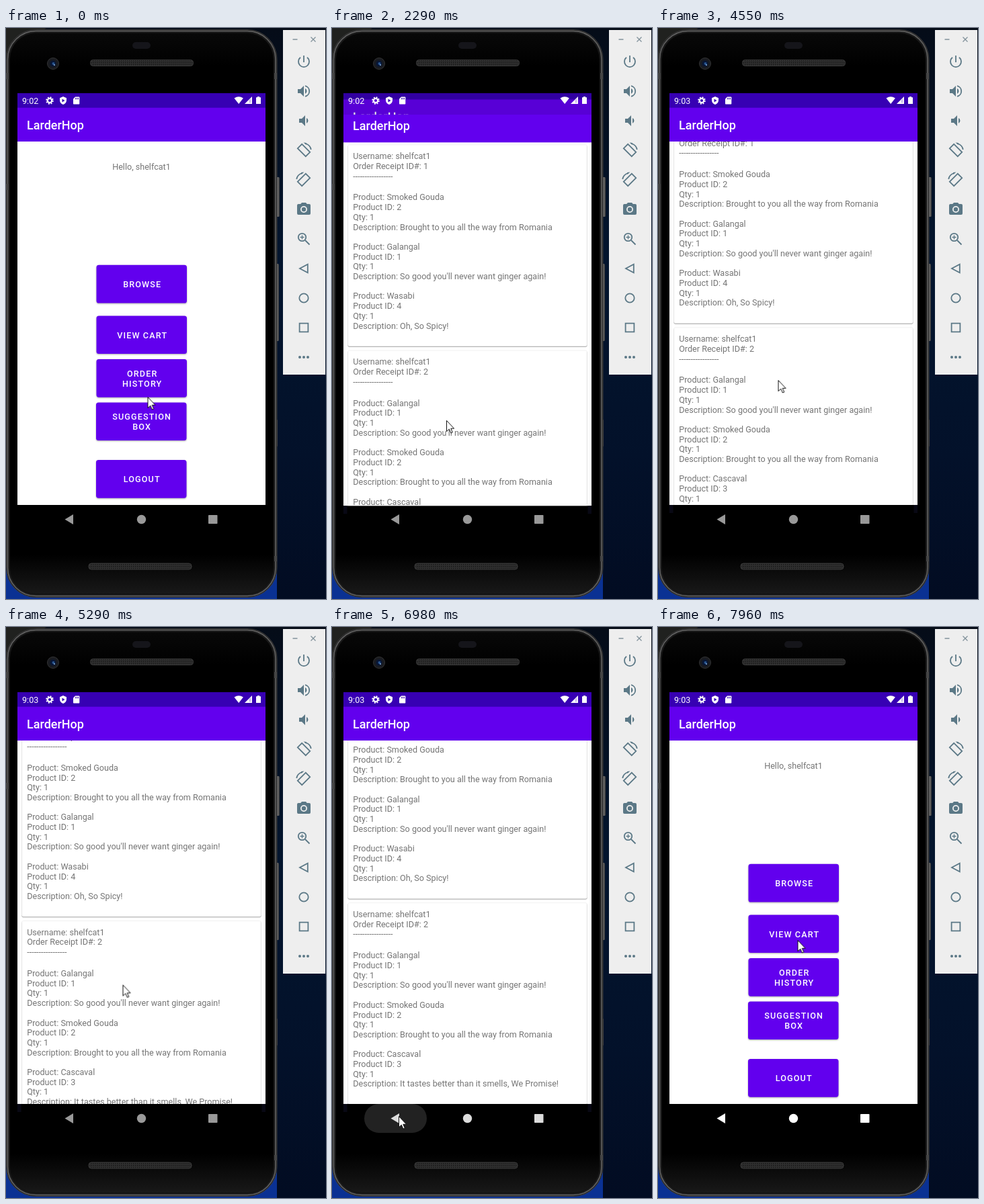
These frames come from a looping animation (476x850 px, 7990 ms). An HTML page:

```html
<!DOCTYPE html>
<html lang="en">
<head>
<meta charset="utf-8">
<title>Order history demo</title>
<style>
  html, body { margin: 0; width: 100%; height: 100%; overflow: hidden; background: #020b1e; }
  #stage { position: relative; width: 476px; height: 850px; overflow: hidden; font-family: Roboto, "Noto Sans", sans-serif; }
  svg { position: absolute; left: 0; top: 0; display: block; }
  .win { position: absolute; left: 17px; top: 97px; width: 369px; height: 656px; overflow: hidden; }
  .screen { background: #000; }
  text { font-size: 12.6px; white-space: pre; }
  .body { fill: #757575; }
  .title { font-size: 18px; font-weight: 500; fill: #fff; }
  .label { font-weight: 500; letter-spacing: 1.125px; text-anchor: middle; fill: #fff; }
  .btn { fill: #6200ee; filter: drop-shadow(0 1.2px 1px #0005); }
  .card { fill: #fff; stroke: #eee; stroke-width: .8; filter: drop-shadow(0 1px .7px #0005); }
  .icon { fill: #5b7886; }
  .line { fill: none; stroke: #5b7886; stroke-width: 1.8; }

  #menu, #list, #scroll, #glow, #ripple, #pill, #nav, #early, #late, #cursor {
    animation: 7990ms linear infinite;
  }
  #menu { animation-name: menu; }
  #list { animation-name: list; }
  #scroll { animation-name: scroll; }
  #glow { animation-name: glow; transform-origin: 201.5px 710px; }
  #ripple { animation-name: ripple; transform-origin: 207px 514px; }
  #pill { animation-name: pill; transform-origin: 94.5px 731.5px; }
  #nav { animation-name: nav; }
  #early { animation-name: early; }
  #late { animation-name: late; }
  #cursor { animation-name: cursor; }

  @keyframes menu {
    0%, 25.03% { transform: none; opacity: 1; animation-timing-function: cubic-bezier(.3,0,.1,1); }
    30.29%, 88.36% { transform: translateY(-13px); opacity: .9; animation-timing-function: cubic-bezier(.3,0,.1,1); }
    93.68%, 100% { transform: none; opacity: 1; }
  }
  @keyframes list {
    0%, 25.02% { transform: translateY(27px); clip-path: inset(100% 0 0 0); }
    25.03% { transform: translateY(27px); clip-path: inset(95.9% 0 0 0); animation-timing-function: cubic-bezier(.3,0,.1,1); }
    30.29%, 88.36% { transform: none; clip-path: inset(0 0 0 0); animation-timing-function: cubic-bezier(.3,0,.1,1); }
    93.68% { transform: translateY(27px); clip-path: inset(95.9% 0 0 0); }
    93.69%, 100% { transform: translateY(27px); clip-path: inset(100% 0 0 0); }
  }
  @keyframes scroll {
    0%, 39.1% { transform: none; }
    40.43% { transform: translateY(-19.5px); animation-timing-function: ease-out; }
    47.5%, 53.19% { transform: translateY(-50px); }
    56.95% { transform: translateY(-33px); animation-timing-function: ease-out; }
    57.9%, 62.83% { transform: translateY(-20px); animation-timing-function: ease-in-out; }
    70.1%, 100% { transform: translateY(-68px); }
  }
  @keyframes glow {
    0%, 69.4% { transform: scaleY(0); opacity: 0; }
    72%, 74.1% { transform: none; opacity: .14; animation-timing-function: ease-out; }
    81.7%, 100% { transform: scaleY(0); opacity: 0; }
  }
  @keyframes ripple {
    0%, 22.3% { transform: scale(0); opacity: .07; }
    23.4% { transform: scale(1); opacity: .07; }
    25% { transform: scale(2.1); opacity: .07; }
    27.5%, 100% { transform: scale(2.1); opacity: 0; }
  }
  @keyframes pill {
    0%, 85.6% { transform: scale(.3, .7); opacity: 0; }
    86% { transform: scale(.6, .9); opacity: 1; }
    87%, 88.4% { transform: none; opacity: 1; }
    91%, 100% { transform: none; opacity: 0; }
  }
  @keyframes nav {
    0%, 85.8% { fill: #999; }
    87.36% { fill: #dcdcdc; }
    88.4%, 100% { fill: #fff; }
  }
  @keyframes early {
    0%, 53.81% { opacity: 1; }
    53.82%, 100% { opacity: 0; }
  }
  @keyframes late {
    0%, 53.81% { opacity: 0; }
    53.82%, 100% { opacity: 1; }
  }
  @keyframes cursor {
    0%, 10.1% { transform: translate(210.5px, 549px); }
    11.39%, 17.77% { transform: translate(204px, 544px); animation-timing-function: ease-in-out; }
    21.28%, 25.66% { transform: translate(208px, 513px); animation-timing-function: ease-in-out; }
    30.29%, 32.92% { transform: translate(157px, 608px); animation-timing-function: ease-in-out; }
    36.05%, 41.3% { transform: translate(216.5px, 437px); animation-timing-function: ease-in-out; }
    48.81%, 49.3% { transform: translate(204px, 475px); }
    50.06%, 53.19% { transform: translate(204px, 473px); animation-timing-function: ease-out; }
    56.95%, 62.83% { transform: translate(178.5px, 524px); animation-timing-function: ease-in-out; }
    72.22%, 73.09% { transform: translate(160px, 555px); }
    74.09%, 74.6% { transform: translate(149.5px, 579px); animation-timing-function: ease-in-out; }
    81.73%, 88.86% { transform: translate(99px, 728px); animation-timing-function: ease-in-out; }
    94.99%, 95.62% { transform: translate(207px, 476px); animation-timing-function: ease-out; }
    99.62%, 100% { transform: translate(207.5px, 466px); }
  }
</style>
</head>
<body>
<div id="stage">
  <svg width="476" height="850" viewBox="0 0 476 850">
    <defs>
      <linearGradient id="desk" x2="0" y2="1">
        <stop offset="0" stop-color="#050c18"/><stop offset=".4" stop-color="#03152e"/>
        <stop offset=".75" stop-color="#03112a"/><stop offset="1" stop-color="#020c22"/>
      </linearGradient>
      <linearGradient id="face" x2="0" y2="1">
        <stop offset="0" stop-color="#080808"/><stop offset=".06" stop-color="#000"/>
        <stop offset=".93" stop-color="#000"/><stop offset="1" stop-color="#191919"/>
      </linearGradient>
      <linearGradient id="key">
        <stop offset="0" stop-color="#333"/><stop offset=".5" stop-color="#777"/><stop offset="1" stop-color="#333"/>
      </linearGradient>
      <pattern id="mesh" width="3" height="3" patternUnits="userSpaceOnUse">
        <rect width="3" height="3" fill="#303030"/><rect width="1.5" height="1.5" fill="#151515"/>
      </pattern>
    </defs>
    <rect width="476" height="850" fill="url(#desk)"/>
    <path d="M0 0H60L0 45Z" fill="#20211f"/>
    <path d="M0 790H403V850H0Z" fill="#0a3193"/>
    <g fill="url(#key)">
      <rect x="401" y="222" width="6" height="59" rx="1.5"/>
      <rect x="401" y="351" width="5" height="115" rx="1.5"/>
      <rect x="400" y="583" width="4" height="40" rx="1"/>
    </g>
    <rect x=".5" y="2.500" width="402.500" height="845" rx="44" fill="#1c1c1c" stroke="#3c3c3c"/>
    <rect x="2.500" y="4.500" width="398.500" height="841" rx="42" fill="none" stroke="#666" stroke-width="1.500"/>
    <rect x="5.500" y="7.500" width="392.500" height="835" rx="39" fill="url(#face)" stroke="#111"/>
    <path d="M0 67h4v9h-4zM399 67h4v9h-4zM0 232h4v9h-4zM399 786h4v8h-4z" fill="#444"/>
    <rect x="188" y="21" width="27" height="10" rx="5" fill="#15151a"/>
    <rect x="125.500" y="47.500" width="153" height="9" rx="4" fill="url(#mesh)" stroke="#3b3b3b"/>
    <rect x="123" y="797" width="153" height="9" rx="4" fill="url(#mesh)" stroke="#3b3b3b"/>
    <circle cx="70" cy="53" r="8.500" fill="#191b20" stroke="#333"/>
    <circle cx="70" cy="53" r="4.500" fill="#081635"/>
    <circle cx="70.500" cy="53" r="2" fill="#28558f"/>
    <circle cx="72" cy="55" r=".9" fill="#9cc4ee"/>

    <rect x="412" y="3" width="63" height="513" fill="#eee"/>
    <path d="M426.500 17h7M453.500 13.500l7 7m0-7l-7 7" fill="none" stroke="#81919a" stroke-width="1.300"/>
    <g id="tools"></g>
  </svg>

  <div class="win screen">
    <div id="menu" class="win" style="left:0;top:0"></div>
    <div id="list" class="win" style="left:0;top:0"></div>
  </div>

  <svg width="476" height="850" viewBox="0 0 476 850">
    <g fill="#fff">
      <text id="early" x="24" y="112.500">9:02</text>
      <text id="late" x="24" y="112.500">9:03</text>
      <g fill="none" stroke="#fff">
        <circle cx="65" cy="108" r="3.200" stroke-width="2.200"/>
        <circle cx="65" cy="108" r="4.900" stroke-width="1.700" stroke-dasharray="2 1.850"/>
      </g>
      <path d="M85 102l5 2.200v3.300c0 3-2 5.600-5 6.500c-3-.9-5-3.500-5-6.500v-3.300z"/>
      <path d="M83.500 105.500v5l4-2.500z" fill="#3700b3"/>
      <path d="M103 102.500h5.500q.8 0 .8.800v9.400q0 .8-.8.800h-7.700q-.8 0-.8-.8v-7.200z"/>
      <path d="M103.500 104v2.300M105.500 104v2.300M107.500 104v2.300" stroke="#3700b3"/>
      <path d="M339.500 104.500q6.700-4.700 13.400 0l-6.700 8.500z"/>
      <path d="M366 102v11h-11z"/>
      <path d="M361.500 107.500l3-3v7h-3z" fill="#3700b3" opacity=".25"/>
      <path d="M374 102h3v1.200h2v9.800h-7v-9.800h2z"/>
    </g>
    <rect id="pill" x="48" y="710" width="93" height="43" rx="21.500" fill="#222"/>
    <g id="nav">
      <path d="M87.500 731.500L100 724V739Z"/>
      <circle cx="201.500" cy="731.500" r="6.700"/>
      <rect x="301" y="725" width="13.500" height="13" rx=".8"/>
    </g>
    <g id="cursor">
      <path d="M.5.500V16.700L4.300 13.200L6.900 19L9.300 18L6.800 12.300H11.600Z" fill="#fff" stroke="#111"/>
    </g>
  </svg>
</div>

<script>
  const USER = "shelfcat1", LINE = 14.7;
  const $ = id => document.getElementById(id);
  const text = (cls, x, y, s) => `<text class="${cls}" x="${x}" y="${y}">${s}</text>`;
  const rect = (x, y, w, h, attrs) => `<rect x="${x}" y="${y}" width="${w}" height="${h}" ${attrs}/>`;

  // Windows keep stage coordinates through their viewBox.
  const page = inner => `<svg width="369" height="656" viewBox="17 97 369 656">
    ${rect(17, 97, 369, 656, 'fill="#fff"')}${inner}
    ${rect(17, 710, 369, 43, 'fill="#000"')}
    ${rect(17, 97, 369, 22, 'fill="#3700b3"')}
    ${rect(17, 118.7, 369, 50.3, 'fill="#6200ee"')}
    ${text("title", 31, 150.8, "LarderHop")}`;

  const button = (x, y, ...lines) => {
    const first = y + 33.2 - (lines.length - 1) * LINE / 2;
    const ripple = lines[0] === "ORDER"
      ? `<clipPath id="edge">${rect(x, y, 134.5, 56.7, 'rx="3.6"')}</clipPath>
         <g clip-path="url(#edge)"><circle id="ripple" cx="207" cy="514" r="41" fill="#fff"/></g>` : "";
    return rect(x, y, 134.5, 56.7, 'rx="3.6" class="btn"') + ripple +
      lines.map((s, i) => text("label", x + 68.2, first + i * LINE, s)).join("");
  };

  $("menu").innerHTML = page(
    `<text class="body" x="201.5" y="211.2" text-anchor="middle">Hello, ${USER}</text>` +
    button(134.5, 352.8, "BROWSE") +
    button(134.5, 428.4, "VIEW CART") +
    button(134.5, 493, "ORDER", "HISTORY") +
    button(134, 557.4, "SUGGESTION", "BOX") +
    button(134, 643, "LOGOUT")) + "</svg>";

  const gouda = ["Smoked Gouda", 2, "Brought to you all the way from Romania"];
  const galangal = ["Galangal", 1, "So good you'll never want ginger again!"];
  const wasabi = ["Wasabi", 4, "Oh, So Spicy!"];
  const cascaval = ["Cascaval", 3, "It tastes better than it smells, We Promise!"];

  const rows = (y, lines) => lines.map((s, i) => text("body", 31.2, y + i * LINE, s)).join("");
  const card = (id, y, items) =>
    rect(23.7, y, 355.6, 299.7, 'rx="2" class="card"') +
    rows(y + 21.3, [`Username: ${USER}`, `Order Receipt ID#: ${id}`, "-".repeat(17)]) +
    items.map(([name, num, about], i) => rows(y + 82.6 + i * 5 * LINE,
      [`Product: ${name}`, `Product ID: ${num}`, "Qty: 1", `Description: ${about}`])).join("");

  $("list").innerHTML = page(
    `<g id="scroll">${card(1, 172.5, [gouda, galangal, wasabi])}${card(2, 478.7, [galangal, gouda, cascaval])}</g>
     <circle id="glow" cx="201.5" cy="1148" r="491" fill="#6200ee"/>`) +
    rect(17, 710, 5.5, 12, 'fill="#080814"') + rect(380.5, 710, 5.5, 12, 'fill="#080814"') + "</svg>";

  // Emulator toolbar icons on a 24px grid, one every 44px.
  const fill = d => `<path class="icon" fill-rule="evenodd" d="${d}"/>`;
  const line = d => `<path class="line" d="${d}"/>`;
  const turn = line("M9.200 2.800L21.200 14.800L14.800 21.200L2.800 9.200Z") +
    line("M14.500 2Q21.500 4.200 22.800 11") + fill("M11.500.500L16 1L15.500 4z");
  const tools = [
    line("M12 3v10") + line("M7 5.800A8 8 0 1 0 17 5.800"),
    fill("M3 9v6h4l5 5V4L7 9zM14 8q2.500 1.200 2.500 4t-2.500 4z") + line("M14 4.200a8 8 0 0 1 0 15.600"),
    fill("M5 9v6h4l5 5V4L9 9zM16 8q2.500 1.200 2.500 4t-2.500 4z"),
    turn,
    `<g transform="translate(24) scale(-1 1)">${turn}</g>`,
    fill("M9 2L7.200 4H4q-2 0-2 2v12q0 2 2 2h16q2 0 2-2V6q0-2-2-2h-3.200L15 2zM12 7a5 5 0 1 1 0 10a5 5 0 1 1 0-10z") +
      '<circle class="icon" cx="12" cy="12" r="3.200"/>',
    '<circle class="line" cx="9.500" cy="9.500" r="5.700"/>' + line("M14 14l6.500 6.500") +
      '<path class="line" style="stroke-width:1.300" d="M9.500 6.500v6M6.500 9.500h6"/>',
    line("M17.800 5.700V18.300L6 12Z"),
    '<circle class="line" cx="12" cy="12" r="6.700"/>',
    line("M5.600 5.600H18.400V18.400H5.600Z"),
    [6, 12, 18].map(x => `<circle class="icon" cx="${x}" cy="12" r="2"/>`).join("")
  ];
  $("tools").innerHTML = tools.map((s, i) =>
    `<g transform="translate(431 ${38 + 44 * i})">${s}</g>`).join("");
</script>
</body>
</html>
```
